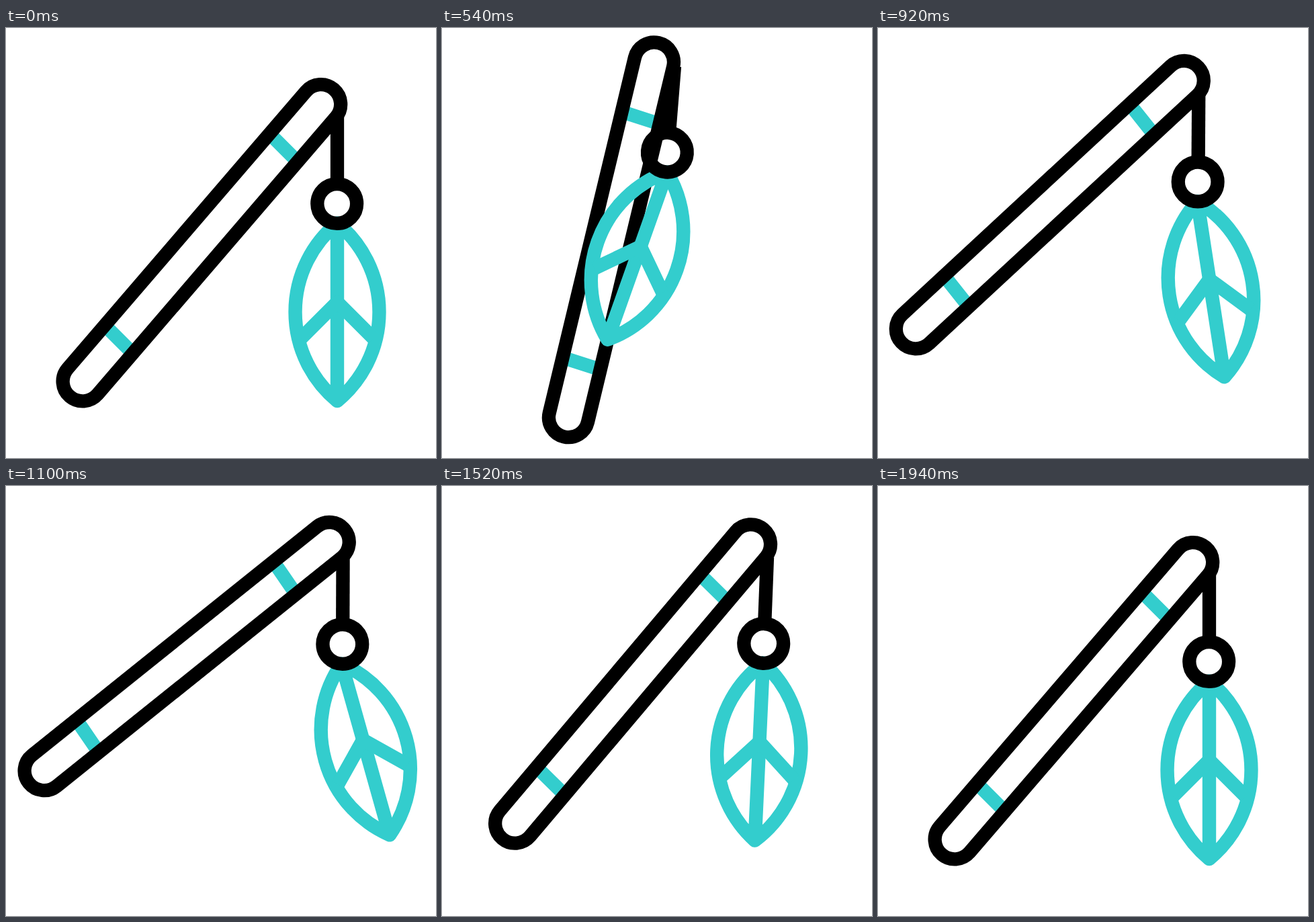
An HTML page that plays this animation: 640 by 640 pixels, repeating every 2400 ms.

```html
<!DOCTYPE html>
<html lang="en">
<head>
<meta charset="utf-8">
<title>Swinging leaf charm</title>
<style>
  html, body { margin: 0; width: 100%; height: 100%; overflow: hidden; background: #fff; }
  svg { display: block; width: 100%; height: 100%; }
  .line { fill: none; stroke: #000; stroke-width: 20.3; }
  .teal { fill: none; stroke: #33cdcd; stroke-width: 20.4; stroke-linejoin: round; }
</style>
</head>
<body>
<svg viewBox="0 0 640 640">
  <g id="body">
    <path class="teal" d="M391.5 156.5L435.5 200.5M146 441.5L190 485.5"/>
    <rect class="line" x="-301.4" y="-29.4" width="602.8" height="58.8" rx="29.4"
          transform="translate(291.4 319.75) rotate(-49.3)"/>
    <g id="cord">
      <g id="leaf" class="teal">
        <path d="M493 290.5A171.2 171.2 0 0 0 493 555A171.2 171.2 0 0 0 493 290.5V555"/>
        <path d="M439 462L493 408L547 462"/>
      </g>
      <path class="line" d="M493 133V234"/>
      <circle class="line" cx="492.7" cy="261.5" r="29.4"/>
    </g>
  </g>
</svg>
<script>
const LOOP = 2400, STEP = 20;

// Smooth curve through values at the given times: it rests at each extreme
// (a plain ease in and out) and flows through the points between.
function curve(times, values) {
  const last = times.length - 1;
  const secant = i => (values[i + 1] - values[i]) / (times[i + 1] - times[i]);
  const slopes = times.map((_, i) => {
    if (i === 0 || i === last) return 0;
    const a = secant(i - 1), b = secant(i);
    if (a * b <= 0) return 0;
    return Math.sign(a) * Math.min(3 * Math.abs(a), 3 * Math.abs(b), 0.75 * Math.abs(a + b));
  });
  return t => {
    if (t >= times[last]) return values[last];
    const i = times.findIndex(end => t < end) - 1;
    const h = times[i + 1] - times[i], p = (t - times[i]) / h, q = 1 - p;
    return values[i] + (values[i + 1] - values[i]) * p * p * (3 - 2 * p)
      + h * p * q * (slopes[i] * q - slopes[i + 1] * p);
  };
}

// The whole charm drifts left, up and back.
const drift = [0, 300, 680, 1080, 1320, 1870];
const shiftX = curve(drift, [0, -22.5, -46.5, -24, -15.9, 0]);
const shiftY = curve(drift, [0, -6.7, -28, -61, -48.6, 0]);

// Fading swings: the cord keeps the stick's beat, the leaf lags behind.
const beats = [0, 588, 1027, 1380, 1610, 1940];
const tilt = curve(beats, [0, -27.7, 12.5, -5, 1.8, 0]);
const cordSwing = curve(beats, [0, 32.4, -12.9, 10, -1, 0]);
const leafAngle = curve([0, 665, 1045, 1345, 1690, 1940], [0, 21.5, -19, 18.4, -12.4, 0]);

const [body, cord, leaf] = ["body", "cord", "leaf"].map(id => document.getElementById(id));
const place = (el, transform) => el.setAttribute("transform", transform);

function draw(now) {
  const t = Math.floor((now % LOOP) / STEP) * STEP;
  const stick = tilt(t), swing = cordSwing(t);
  place(body, `translate(${shiftX(t)} ${shiftY(t)}) rotate(${stick} 320 320)`);
  place(cord, `rotate(${swing} 493 133)`);
  place(leaf, `rotate(${leafAngle(t) - stick - swing} 493 296)`);
}

function tick() {
  draw(performance.now());
  requestAnimationFrame(tick);
}
tick();
</script>
</body>
</html>
```
